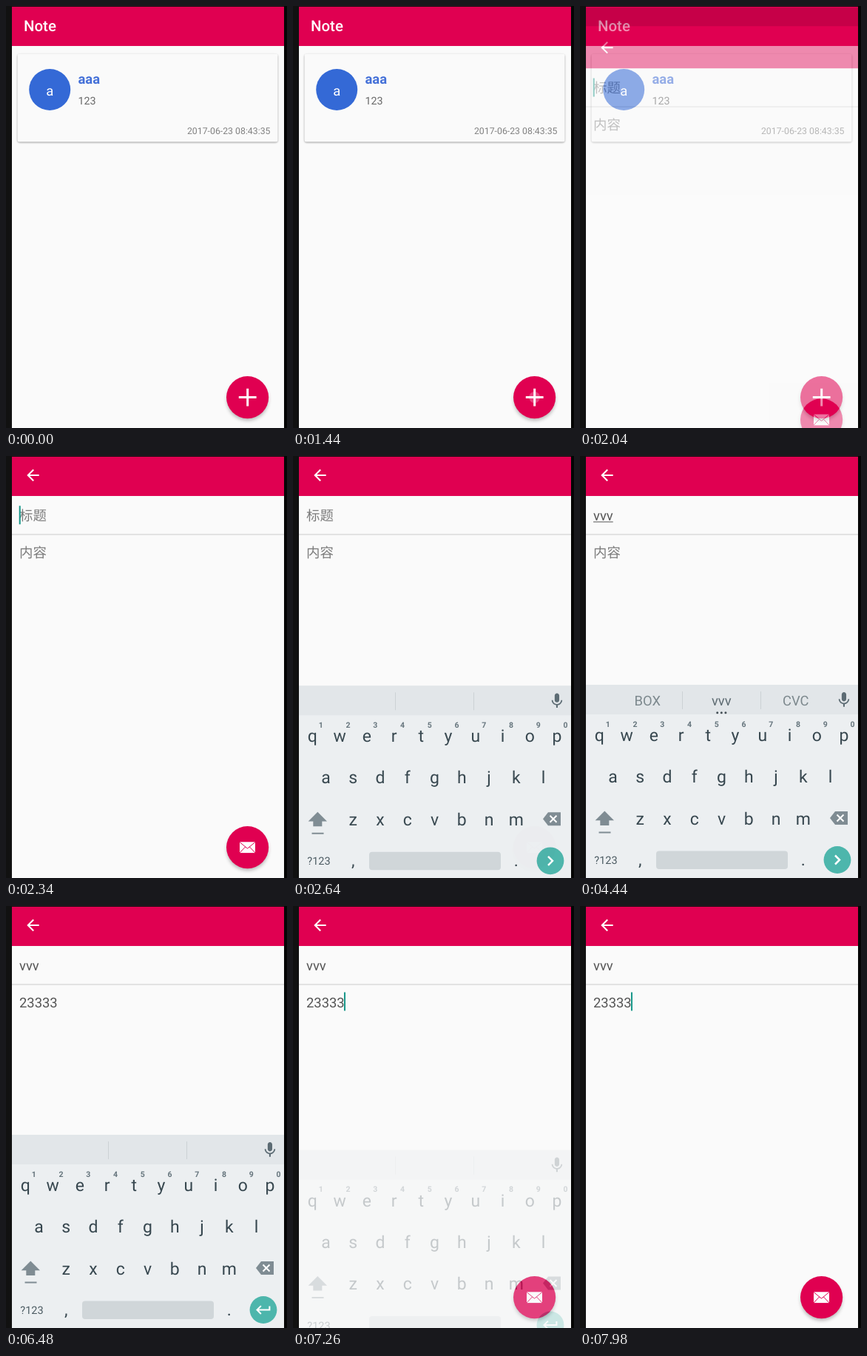
These frames come from a looping animation (380x570 px, 8 s). An HTML page:

```html
<!DOCTYPE html>
<html lang="zh">
<head>
<meta charset="utf-8">
<title>Note</title>
<style>
html, body { margin: 0; width: 100%; height: 100%; overflow: hidden; background: #111; }
svg { display: block; width: 380px; height: 570px; font: 18.4px Roboto, "Noto Sans CJK SC", sans-serif; text-rendering: geometricPrecision; }
.mid { text-anchor: middle; }
.key { font-size: 23px; fill: #37474f; }
.digit { font-size: 10.5px; font-weight: 700; fill: #66757d; }
.hint { fill: #7b7b7b; }
.typed { fill: #555; }
</style>
</head>
<body>
<svg viewBox="0 0 380 570">
  <defs>
    <clipPath id="screen"><rect x="8" y="1" width="368" height="569"/></clipPath>
    <clipPath id="disc"><circle cx="326.6" cy="528.6" r="28.6"/></clipPath>
    <filter id="soft" x="-30%" y="-30%" width="160%" height="160%"><feGaussianBlur stdDeviation="2.6"/></filter>
    <filter id="thin" x="-5%" y="-5%" width="110%" height="110%"><feGaussianBlur stdDeviation=".8"/></filter>
    <g id="fab">
      <circle cx="326.6" cy="532" r="28" fill="#000" opacity=".27" filter="url(#soft)"/>
      <circle cx="326.6" cy="528.6" r="28.6" fill="#e00051"/>
    </g>
  </defs>
  <rect width="380" height="570" fill="#111"/>
  <rect x="376" width="4" height="570" fill="#050505"/>
  <g clip-path="url(#screen)">
    <g id="list">
      <rect x="8" width="368" height="570" fill="#fafafa"/>
      <rect x="8" width="368" height="54" fill="#e00051"/>
      <text x="24" y="33.5" font-size="20.4" font-weight="500" fill="#fff">Note</text>
      <rect x="15.5" y="65.5" width="352" height="119" rx="3" opacity=".38" filter="url(#thin)"/>
      <rect x="15.5" y="64.5" width="352" height="119" rx="2.5" fill="#fafafa"/>
      <circle cx="59.2" cy="113" r="28" fill="#3469d6"/>
      <text class="mid" x="59.2" y="120.5" fill="#fff">a</text>
      <text x="97.5" y="105" font-weight="700" fill="#4470d8">aaa</text>
      <text x="97.5" y="133.3" font-size="14.3" fill="#686868">123</text>
      <text x="357.5" y="172.5" font-size="12.3" text-anchor="end" fill="#818181">2017-06-23 08:43:35</text>
      <use href="#fab"/>
      <circle id="ripple" cx="326.6" cy="528.6" fill="#fff" clip-path="url(#disc)"/>
      <path d="M314.8 528.6h23.8M326.7 516.7v23.8" stroke="#fff" stroke-width="3"/>
    </g>
    <g id="editor">
      <rect x="8" y="-28" width="368" height="598" fill="#fafafa"/>
      <rect x="8" y="-28" width="368" height="82" fill="#e00051"/>
      <rect x="8" y="-28" width="368" height="25" fill="#a8003f"/>
      <path transform="translate(24.2 13.7) scale(1.022)" fill="#fff" d="M20 11H7.83l5.59-5.59L12 4l-8 8 8 8 1.41-1.41L7.83 13H20v-2z"/>
      <text id="title" x="18" y="87"></text>
      <text id="body" x="18" y="136.5"></text>
      <rect id="underline" x="18" y="88.5" height="1" fill="#555"/>
      <rect x="8" y="105.2" width="368" height="1.6" fill="#dcdcdc"/>
      <rect id="cursor" width="2" height="25" fill="#159688"/>
      <use href="#fab"/>
      <rect x="316" y="521.3" width="21" height="14.8" fill="#fff"/>
      <path d="M316 521.5l10.5 8.7 10.5-8.7M316 536l7.5-8M337 536l-7.5-8" fill="none" stroke="#e00051"/>
    </g>
    <g id="keyboard">
      <rect x="8" y="309" width="368" height="262" fill="#eceff1"/>
      <rect x="8" y="309" width="368" height="40" fill="#e2e6e9"/>
      <path d="M138.5 318v24M244.5 318v24" stroke="#ccd2d5"/>
      <g id="words" class="mid" fill="#7c888d">
        <text x="91.3" y="337"></text>
        <text x="191.3" y="337" fill="#5c6a71"></text>
        <text x="291.7" y="337"></text>
      </g>
      <path id="dots" d="M185.7 346.8h.01m5.6 0h.01m5.6 0h.01" stroke="#444f55" stroke-width="3" stroke-linecap="round"/>
      <path transform="translate(344.6 317) scale(1.03)" fill="#5c6b73" d="M12 14c1.66 0 2.99-1.34 2.99-3L15 5c0-1.66-1.34-3-3-3S9 3.34 9 5v6c0 1.66 1.34 3 3 3zm5.3-3c0 3-2.54 5.1-5.3 5.1S6.7 14 6.7 11H5c0 3.41 2.72 6.23 6 6.72V21h2v-3.28c3.28-.48 6-3.3 6-6.72h-1.7z"/>
      <g id="keys" class="mid"></g>
      <path d="M33.3 479.5l12.7 12.7h-6.7v6.8h-12v-6.8h-6.7zM25.5 507.5h16v2h-16z" fill="#7f8c93"/>
      <path d="M338 489l7-9h17v18h-17z" fill="#7f8c93"/>
      <path d="M347.5 484.5l9 9m0-9l-9 9" stroke="#fff" stroke-width="2"/>
      <text class="mid" x="35" y="551" font-size="14.5" fill="#4c5b62">?123</text>
      <rect x="103" y="533.5" width="178" height="24.5" rx="4" fill="#d0d6d9"/>
      <circle cx="348" cy="545.5" r="18.4" fill="#4db6ac"/>
      <path id="next" d="M345 539.5l6 6-6 6" fill="none" stroke="#fff" stroke-width="2.5"/>
      <path id="enter" transform="translate(336 533.3) scale(1.02)" fill="#fff" d="M19 7v4H5.83l3.58-3.59L8 6l-6 6 6 6 1.41-1.41L5.83 13H21V7z"/>
    </g>
  </g>
</svg>
<script>
const LOOP = 8000, STEP = 60;
const $ = id => document.getElementById(id);
const set = (id, attrs) => { for (const k in attrs) $(id).setAttribute(k, attrs[k]); };
const show = (id, on) => set(id, { visibility: on ? 'visible' : 'hidden' });
const clamp = x => Math.min(1, Math.max(0, x));
const remain = (t, start, length, power) => (1 - clamp((t - start) / length)) ** power;
// latest value of a [time, value] list
const at = (list, t) => list.filter(e => e[0] <= t).pop()[1];

const titles = [[0, ''], [3000, 'v'], [3300, 'vv'], [3840, 'vvv']];
const bodies = [[0, ''], [5220, '2'], [5400, '23'], [5700, '233'], [5820, '2333'], [6000, '23333']];
const blinks = [[0, 1], [2520, 0], [3000, 1], [4440, 0], [4680, 1], [5160, 0], [5220, 1],
  [6480, 0], [6960, 1], [7500, 0], [7980, 1]];
const guesses = [[0, ['', '', '']], [3180, ['', 'v', '']], [3360, ['BV', 'vv', 'CV']],
  [3900, ['BV', 'vvv', 'CV']], [3960, ['BOX', 'vvv', 'CVC']], [4680, ['', '', '']]];

const label = (cls, x, y, s) => `<text class="${cls}" x="${x}" y="${y}">${s}</text>`;
const row = (cls, x, y, s) => [...s].map((c, i) => label(cls, x + i * 36.75, y, c)).join('');
$('keys').innerHTML = row('key', 26.3, 385, 'qwertyuiop') + row('digit', 37.8, 365.5, '1234567890') +
  row('key', 44.5, 441, 'asdfghjkl') + row('key', 81.3, 497.5, 'zxcvbnm') +
  label('key', 81.3, 553, ',') + label('key', 301.8, 553, '.');

function field(id, text, hint) {
  $(id).textContent = text || hint;
  set(id, { class: text ? 'typed' : 'hint' });
}

function slide(id, alpha, dy) {
  show(id, alpha > 0);
  set(id, { opacity: alpha, transform: `translate(0 ${dy})` });
}

function render(t) {
  const press = clamp((t - 1380) / 240);
  set('ripple', { r: 30 * press, opacity: t < 1440 ? 0 : .25 * remain(t, 1560, 240, 1) });

  slide('editor', t < 2040 ? 0 : 1 - remain(t, 2004, 200, 3), 52 * remain(t, 2004, 350, 5));

  const leave = clamp((t - 7150) / 150);
  const entered = t < 2520 ? 0 : 1 - remain(t, 2484, 200, 3);
  slide('keyboard', entered * (1 - leave), 52 * remain(t, 2484, 300, 5) + 52 * leave ** 3);

  const title = at(titles, t), body = at(bodies, t), inBody = t >= 4680;
  field('title', title, '标题');
  field('body', body, '内容');
  const titleWidth = title.length * 8.9;
  set('underline', { width: t >= 3180 && !inBody ? titleWidth : 0 });
  set('cursor', { x: 17.7 + (inBody ? body.length * 10.25 : titleWidth), y: inBody ? 116.5 : 67.3 });
  set('cursor', { opacity: at(blinks, t) });

  const words = at(guesses, t);
  [...$('words').children].forEach((e, i) => e.textContent = words[i]);
  set('dots', { opacity: words[1] ? 1 : 0 });
  set('next', { opacity: t < 4740 ? 1 : 0 });
  set('enter', { opacity: t < 4740 ? 0 : 1 });
}

const begin = performance.now();
function frame() {
  const t = (performance.now() - begin) % LOOP;
  render(Math.floor(t / STEP) * STEP);
  requestAnimationFrame(frame);
}
frame();
</script>
</body>
</html>
```
